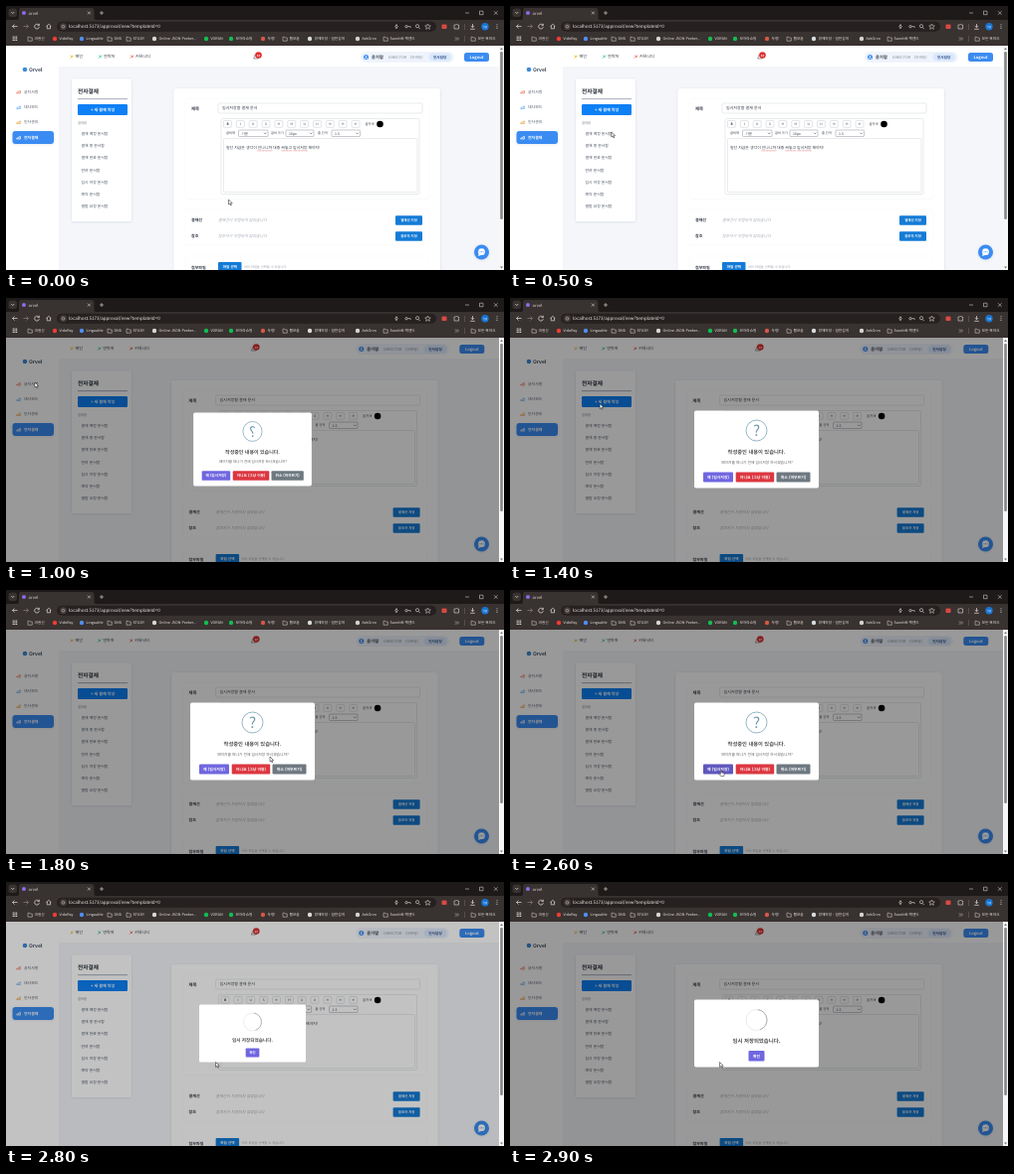
Write an HTML page that moves like this. It is 500 px wide and 266 px high and loops after 3 s.

```html
<!DOCTYPE html>
<html lang="ko">
<head>
<meta charset="utf-8">
<title>orvel</title>
<style>
html, body { margin: 0; width: 100%; height: 100%; overflow: hidden; background: #f4f6f9; }
svg { display: block; width: 100vw; height: 100vh; }
text { font-family: "Noto Sans CJK KR", "Noto Sans CJK", "Noto Sans", sans-serif; text-rendering: geometricPrecision; white-space: pre; }
</style>
</head>
<body>
<svg id="stage" viewBox="0 0 500 266" preserveAspectRatio="none"></svg>
<script>
const LOOP = 3000, STEP = 100;
const BLUE = '#3b8cf2', INK = '#333a45';
const stage = document.getElementById('stage');

// Markup helpers
const rect = (x, y, w, h, fill, r = 0, extra = '') =>
  `<rect x="${x}" y="${y}" width="${w}" height="${h}" rx="${r}" fill="${fill}" ${extra}/>`;
const box = (x, y, w, h, r = 1, line = '#d3d6db') =>
  rect(x, y, w, h, '#fff', r, `stroke="${line}" stroke-width=".5"`);
const dot = (x, y, r, fill, extra = '') => `<circle cx="${x}" cy="${y}" r="${r}" fill="${fill}" ${extra}/>`;
const path = (d, color, w = .7, extra = '') =>
  `<path d="${d}" fill="none" stroke="${color}" stroke-width="${w}" ${extra}/>`;
// y is the middle of the line of text
const text = (x, y, s, size, fill = INK, weight = 400, extra = '') =>
  `<text x="${x}" y="${y + size * .36}" font-size="${size}" fill="${fill}" font-weight="${weight}" ${extra}>${s}</text>`;
const mid = (x, y, s, size, fill, weight = 400) => text(x, y, s, size, fill, weight, 'text-anchor="middle"');
const button = (x, y, w, h, s, size, fill, r = 1, id = '') =>
  rect(x, y, w, h, fill, r, id && `id="${id}"`) + mid(x + w / 2, y + h / 2, s, size, '#fff', 700);
const group = (id, body) => `<g id="${id}">${body}</g>`;
const folder = (x, y) => path(`M${x - 2} ${y - 1.8}h1.6l.7 .8h2v3.2h-4.3z`, '#d6d0ce', .55);

function browser() {
  const c = '#e4dfdd';
  let s = rect(0, 0, 500, 40, '#383230') + rect(0, 0, 500, 14, '#1d1a19') +
    rect(2.5, 2.5, 8.5, 8.5, '#383230', 2.5) + path('M5.3 6l1.5 1.6 1.5-1.6', c) +
    `<path d="M11 14q2 0 2-2V4.5q0-2.5 2.5-2.5H86q2.5 0 2.5 2.5V12q0 2 2 2z" fill="#383230"/>` +
    dot(18, 7, 2, '#8f6bea') + text(22.5, 7, 'orvel', 4.2, c) +
    path('M82 5.6l2.8 2.8m0-2.8l-2.8 2.8M94 7h4m-2-2v4', c, .6) +
    path('M461 7h4M475.5 5.2h3.5v3.5h-3.5zM490 5.2l3.6 3.6m0-3.6l-3.6 3.6', c, .55);
  s += path('M11.5 20.5h-5m2-2l-2 2 2 2', c) + path('M17.5 20.5h5m-2-2l2 2-2 2', '#8b8381') +
    path('M33 19.2a2.4 2.4 0 1 0 .4 2m0-3.4v1.9h-1.9', c) +
    path('M40.5 20.5l2.4-2.2 2.4 2.2m-4 -.5v2.8h3.2v-2.8', c);
  s += rect(51, 15.7, 381, 10, '#262120', 5) + dot(57.5, 20.7, 3.4, '#443d3a') +
    dot(57.5, 20.7, 1.3, 'none', `stroke="${c}" stroke-width=".5"`) +
    text(63, 20.7, 'localhost:5173/approval/new?templateId=0', 4.5, '#f0eceb') +
    path('M392 18.7q2.4 2 0 4q-2.4-2 0-4', c) + dot(402, 20.7, 1.2, 'none', `stroke="${c}" stroke-width=".6"`) +
    path('M403.2 20.7h3v1.2', c, .6) + dot(413, 20.2, 1.6, 'none', `stroke="${c}" stroke-width=".6"`) +
    path('M414.2 21.5l1.5 1.5', c) +
    path('M423.5 18l.8 1.8 2 .2-1.5 1.3 .5 2-1.8-1.1-1.8 1.1 .5-2-1.5-1.3 2-.2z', c, .55);
  s += rect(437.5, 18.5, 5, 4.5, '#d94a43', 1) + path('M450 19h1.5q.8-1.6 1.6 0h1.5v4h-4.6z', c, .6) +
    rect(460, 18, .5, 6, '#75696a') + path('M468.5 18v3.6m-1.7-1.6l1.7 1.7 1.7-1.7m-4 3.3h4.6', c) +
    dot(481, 20.7, 3.7, '#1976d2') + mid(481, 20.7, '가람', 2.5, '#fff');
  for (const y of [18.8, 20.7, 22.6]) s += dot(493, y, .5, c);

  for (let i = 0; i < 9; i++) s += rect(6.7 + i % 3 * 1.7, 30.5 + (i / 3 | 0) * 1.7, 1.1, 1.1, c);
  const marks = [
    [24, '과원신'], [49, 'VidoRay', '#f33b35'], [76, 'Linguable', '#4f8ef0'], [104, 'DNS'], [123, 'STUDY'],
    [149, 'Online JSON Peeker...', '#d8d8d8'], [201, 'VORAN', '#12bd52'], [226, '모아라쇼핑', '#12bd52'],
    [258, '두링!', '#d8574a'], [280, '웹모음'], [305, '경제마당 - 일반검색', '#d8dcdf'],
    [353, 'AskOrvo', '#d6d3d0'], [381, 'Sundrift 백엔드'], [469, '모든 북마크']
  ];
  for (const [x, label, fill] of marks)
    s += (fill ? dot(x, 33, 2.2, fill) : folder(x, 33)) + text(x + 4.5, 33, label, 3.7, '#ebe6e4');
  return s + path('M451 31.4l1.5 1.6-1.5 1.6m2-3.2l1.5 1.6-1.5 1.6', c, .5) + rect(460, 30, .5, 6, '#75696a');
}

function header() {
  const item = (x, label, color) => path(`M${x - 1.5} 52.5l3-3m-2.5 0l2 2.5`, color, .9) + text(x + 3.5, 51, label, 4.05, INK, 500);
  return rect(0, 40, 495, 21, '#fff') + item(66, '메인', '#f3c13b') +
    group('nav', item(94.5, '연락처', '#38c99a') + item(126.5, '커뮤니티', '#ee6352')) +
    group('bell', path('M248.5 53q1-1 1-2.5t1.5-1.7 1.5 1.7 1 2.5z', '#5c6470', .6) +
      dot(253.5, 49.5, 3.3, '#e02f2f') + mid(253.5, 49.5, '10', 2.9, '#fff', 700)) +
    group('user', rect(356, 46, 93.5, 11, '#eff4fc', 5.5) + dot(361.5, 51.5, 2.5, BLUE) +
      dot(361.5, 50.7, .8, '#fff') + path('M360 53q1.5-1.5 3 0', '#fff', .7) +
      text(367, 51.5, '윤가람', 4.3, INK, 600) + text(384, 51.5, 'DIRECTOR', 3.8, '#858e9c') +
      text(406, 51.5, '(마케팅)', 3.6, '#858e9c') + rect(424.5, 47.5, 22.5, 8, '#dae8fc', 4) +
      mid(435.7, 51.5, '인사담당', 3.7, '#2f4f86', 600) + button(460, 47, 25, 9, 'Logout', 4, BLUE, 2.5));
}

function sidebar() {
  let s = rect(0, 61, 53, 205, '#fff') + dot(19, 64, 2.3, '#3d8cd8') + text(23, 64, 'Orvel', 5, '#3c4a5e', 600) +
    group('hover', rect(7, 80, 41.5, 13, 'url(#pill)', 3)) + rect(6.5, 126, 41.5, 13, BLUE, 3, 'filter="url(#soft)"');
  const items = [['공지사항', 86.5, '#f07d63'], ['대시보드', 102, '#6eb2f0'], ['인사관리', 117, '#e8a74c'], ['전자결재', 132.5, '#fff']];
  items.forEach(([label, y, c], i) => {
    s += path(`M10.5 ${y + 1.2}l3.8-2.4v2.8z`, c, .8) +
      text(18, y, label, 3.9, i === 3 ? '#fff' : '#4b5563', i === 3 ? 700 : 500, i ? '' : 'id="notice"');
  });
  s += rect(66, 73.5, 60, 143.5, '#fff', 1.5, 'filter="url(#soft)"') + text(72, 85.5, '전자결재', 5.7, '#242b35', 600) +
    rect(72, 93.5, 50, .6, '#64748b') + button(72, 99, 50, 11, '+ 새 결재 작성', 4, '#0d80f5', 1.2) +
    text(72, 117.8, '결재함', 3.3, '#7b8491');
  ['결재 예정', '결재 중', '결재 완료', '반려', '임시 저장', '예약', '열람 요청'].forEach((label, i) => {
    s += text(75.5, 128.3 + i * 12.3, label + ' 문서함', 3.85, '#4b5563');
  });
  return s;
}

function form() {
  let s = rect(168.5, 83, 267.5, 190, '#fff', 3, 'filter="url(#soft)"');
  for (const [y, h] of [[93.5, 101], [205, 36], [252, 30]]) s += box(180, y, 245, h, 1.5, '#f4f6f8');
  s += text(186, 103, '제목', 4.3, INK, 600) + box(213, 98, 205, 10) + text(217, 103, '임시저장할 결재 문서', 4) +
    box(216, 113.5, 199, 76, 1.5);
  [...'BIUS≡HUU≡≡≡'].forEach((ch, i) => {
    const x = 222.5 + i * 12.85;
    s += box(x - 4, 115.5, 8, 6.8, 1, '#c6cad0') + mid(x, 119, ch, 3.3, INK, i ? 400 : 700);
  });
  s += text(360.5, 119, '글자색', 3.3) + dot(375.5, 119, 3.3, '#000');
  const select = (x, w, value) => box(x, 125, w, 6.5, .7, '#8d939c') + text(x + 3, 128.3, value, 3.5) +
    path(`M${x + w - 4} 127.7l1.2 1.2 1.2-1.2`, '#333', .55);
  s += text(221, 128.3, '글씨체', 3.3) + select(233.5, 29.5, '기본') + text(266, 128.3, '글씨 크기', 3.2) +
    select(281, 28, '16px') + text(313, 128.3, '줄 간격', 3.2) + select(327, 28.5, '1.5');
  s += box(218.5, 133.5, 194.5, 54) + text(221, 143, '일단 지금은 생각이 안나니까 대충 써놓고 임시저장 해야지!', 3.88);
  for (const [x, w] of [[252.5, 15], [276.5, 11], [288.5, 14.5]])
    s += path(`M${x} 145.8h${w}`, '#e04343', .5, 'stroke-dasharray="1 .4"');
  [['결재선', '결재선이', 216], ['참조', '참조자가', 232]].forEach(([label, who, y], i) => {
    s += text(186, y, label, 4, INK, 600) + text(213, y, who + ' 지정되지 않았습니다', 3.9, '#a3a9b2', 400, 'font-style="italic"') +
      button(391, y - 4.8, 27, 9.5, i ? '참조자 지정' : '결재선 지정', 3.4, '#147bd6');
  });
  return s + text(186, 264, '첨부파일', 4, INK, 600) + button(213, 258, 23.5, 9.5, '파일 선택', 3.6, '#147bd6') +
    text(239, 262.5, '여러 파일을 선택할 수 있습니다', 3.25, '#9aa1ab');
}

const chat = dot(477.5, 248, 7.5, BLUE, 'filter="url(#soft)"') + dot(477.5, 247.7, 3.4, '#fff') +
  '<path d="M475 249l-1 3 3-1z" fill="#fff"/>' + [-1.5, 0, 1.5].map(d => dot(477.5 + d, 247.7, .5, BLUE)).join('');

const scrollbar = rect(495, 40, 5, 226, '#f7f7f7') + rect(496.2, 46, 2.6, 169, '#858585', 1.3) +
  '<path d="M496 44l1.5-2 1.5 2zM496 262.5h3l-1.5 2z" fill="#777"/>';

const choices = [
  ['yes', 194, 30, '예 (임시저장)', '#7066e0'],
  ['no', 226.7, 38.5, '아니요 (그냥 이동)', '#dc3741'],
  ['stay', 267.5, 34, '취소 (머무르기)', '#6e7881']
];
const ask = rect(185, 113.5, 125, 78, '#fff', 1.8) +
  group('mark', dot(0, 0, 10.5, 'none', 'stroke="#87adbd" stroke-width=".9"') + mid(0, 0, '?', 15, '#6c99ad')) +
  mid(247.5, 155.2, '작성중인 내용이 있습니다.', 5.25, '#484848', 600) +
  mid(248, 165.5, '페이지를 떠나기 전에 임시저장 하시겠습니까?', 3.75, '#5d5d5d') +
  choices.map(([id, x, w, label, fill]) => button(x, 175.5, w, 10, label, 3.9, fill, 1, id)).join('');
const saved = rect(185, 118.5, 125, 68, '#fff', 1.8) + dot(247.5, 139, 10.5, 'none', 'stroke="#e3e8e1" stroke-width=".8"') +
  path('M249 128.6A10.5 10.5 0 0 1 251 148.9', '#a3aaa1', .9) +
  mid(247.5, 160.5, '임시 저장되었습니다.', 5.4, '#484848', 600) + button(239.5, 170, 16, 10.5, '확인', 3.9, '#7066e0');

const pointer = '<path d="M0 0v5l1.2-1 .9 1.9 .8-.4-.9-1.8h1.7z" fill="#fff" stroke="#111" stroke-width=".5"/>';
const hand = '<path d="M-.6 .4q.6-.8 1.2 0v2l2 .6q.8 .3 .6 1.2l-.5 2h-2.8l-1.9-2.2q.2-.9 1.4-.1z" fill="#fff" stroke="#111" stroke-width=".5"/>';

stage.innerHTML = `<defs>
  <linearGradient id="pill"><stop offset="0" stop-color="#6aa9ee"/><stop offset="1" stop-color="#8ec2fb"/></linearGradient>
  <filter id="soft" x="-20%" y="-20%" width="140%" height="140%"><feDropShadow dx="0" dy=".5" stdDeviation="1.2" flood-color="#1f3a60" flood-opacity=".12"/></filter>
</defs>` + rect(0, 40, 495, 226, '#f4f6f9') + group('card', form()) + sidebar() + header() + chat +
  rect(0, 40, 495, 226, '#000', 0, 'id="shade"') + group('ask', ask) + group('saved', saved) +
  scrollbar + browser() + group('pointer', pointer) + group('hand', hand);

const $ = id => document.getElementById(id);
const set = (id, name, value) => $(id).setAttribute(name, value);
const show = (id, on) => set(id, 'visibility', on ? 'visible' : 'hidden');
const place = (id, x, y, sx = 1, sy = 1) => set(id, 'transform', `matrix(${sx} 0 0 ${sy} ${x} ${y})`);
const clamp = v => Math.max(0, Math.min(1, v));
const lerp = (a, b, p) => a + (b - a) * p;

const route = [[0, 223.5, 195], [200, 212, 184], [700, 42, 96], [800, 29, 85], [1200, 29, 85],
  [1800, 265, 168], [2400, 212, 181.5], [2600, 212, 181.5], [2700, 210.5, 181.5], [3000, 210.5, 181.5]];
function cursorAt(t) {
  const i = route.findIndex(k => k[0] > t), [t0, x0, y0] = route[i - 1], [t1, x1, y1] = route[i];
  const p = (t - t0) / (t1 - t0), e = p * p * (3 - 2 * p);
  return [lerp(x0, x1, e), lerp(y0, y1, e)];
}

// Dialog pop: grows, overshoots, settles
function pop(ms) {
  if (ms < 135) return lerp(.7, 1.05, ms / 135);
  if (ms < 240) return lerp(1.05, .95, (ms - 135) / 105);
  return lerp(.95, 1, clamp((ms - 240) / 60));
}

function draw(t) {
  const asking = t >= 900 && t < 2700, done = t >= 2775;
  const open = asking || done;
  const age = (t - (done ? 2775 : 900)) * 2.4;
  for (const [id, dx] of [['card', -2.4], ['nav', -.8], ['bell', -2.2], ['user', -4.7]])
    place(id, open ? dx : 0, 0);
  set('shade', 'opacity', open ? .4 * clamp(age / 100) : 0);

  show('ask', asking && age > 0);
  show('saved', done);
  const k = pop(age);
  for (const id of ['ask', 'saved']) place(id, 247.5 * (1 - k), 152.5 * (1 - k), k, k);
  const turn = 2 * Math.PI * (1 - clamp(age / 800)) ** 2.2;
  place('mark', 247.5, 133.5, Math.cos(turn));

  const [x, y] = cursorAt(t);
  let over = false;
  for (const [id, bx, w] of choices) {
    const hit = asking && y > 175.5 && y < 185.5 && x > bx && x < bx + w;
    set(id, 'style', hit ? 'filter:brightness(.85)' : '');
    over = over || hit;
  }
  const glow = t === 800 ? .4 : t === 900 ? .75 : 0;
  set('hover', 'opacity', glow);
  set('notice', 'fill', t === 900 ? '#e8f2fd' : '#4b5563');
  over = over || glow > 0;
  for (const id of ['pointer', 'hand']) place(id, x, y);
  show('pointer', !over);
  show('hand', over);
}

const start = performance.now();
function tick() {
  const t = (performance.now() - start) % LOOP;
  draw(Math.floor(t / STEP) * STEP);
  requestAnimationFrame(tick);
}
tick();
</script>
</body>
</html>
```
